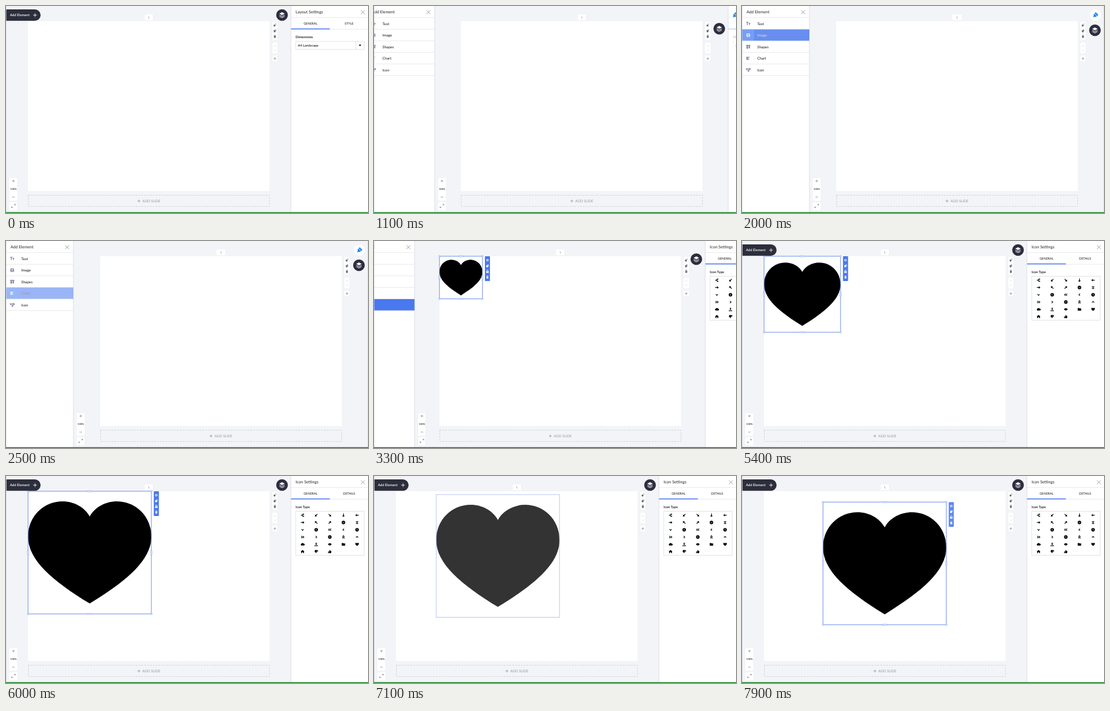
Animation, 640 px wide and 367 px high, one loop 8000 ms. Source, as an HTML page:

```html
<!DOCTYPE html>
<html lang="en">
<head>
<meta charset="utf-8">
<title>Slide editor</title>
<style>
  html, body { margin: 0; width: 100%; height: 100%; overflow: hidden; background: #f3f4f8; }
  svg { display: block; width: 100vw; height: 100vh; }
  text { font-family: Lato, "Open Sans", sans-serif; fill: #222; text-rendering: geometricPrecision; }
  .title { font-size: 7.2px; }
  .tab { font-size: 5.45px; text-anchor: middle; font-weight: 500; }
  .label { font-size: 5.9px; font-weight: 700; }
  .row { font-size: 6.4px; font-weight: 500; }
  .card { fill: #fff; filter: drop-shadow(0 .4px .6px #0003); }
  .line { fill: none; stroke: #e3e4e8; stroke-width: .8; }
  .thin { fill: none; stroke: #777; stroke-width: .7; }
  .pale { fill: none; stroke: #c4c7cf; stroke-width: .7; }
  .bold { fill: none; stroke: #000; stroke-width: 1.2; }
  .blue { fill: #4a78ee; }
  .handle { fill: #fff; stroke: #6d90ec; stroke-width: .7; }
</style>
</head>
<body>
<svg viewBox="0 0 640 367" preserveAspectRatio="none">
  <rect width="640" height="367" fill="#f3f4f8"/>

  <g id="work">
    <rect x="39" y="27" width="427" height="301" fill="#fff"/>
    <rect class="card" x="244.5" y="15" width="16" height="10" rx="1"/>
    <text x="252.5" y="21.6" font-size="4.6" text-anchor="middle" style="fill:#666">1</text>
    <rect x="39.5" y="335.5" width="426.5" height="20" fill="none" stroke="#cdd0d9" stroke-dasharray="3 2"/>
    <path class="thin" d="M232.3 345.7h5.4M235 343v5.4" style="stroke:#888"/>
    <text x="241" y="348" font-size="6.2" style="fill:#96979d">ADD SLIDE</text>
    <g id="slideTools" transform="translate(475.3 0)">
      <rect class="card" x="-5" y="28" width="10" height="32" rx="1"/>
      <rect class="card" x="-5" y="65" width="10" height="19" rx="1"/>
      <rect class="card" x="-5" y="88" width="10" height="10" rx="1"/>
      <g fill="#686b78">
        <path d="M-2 33h3v3.2h-3zM.5 32l1.5-1 .4 2z"/>
        <path d="M-2 43h3v3.4h-3zM-.8 41.8h3v3.4h-.7v-2.7h-2.3z"/>
        <path d="M-1.6 52.8h3.2v3.7h-3.2zM-2 51.7h4v.6h-4zM-.7 51h1.4v.6h-1.4z"/>
      </g>
      <path class="pale" d="M-1.5 71.6 0 70.2l1.5 1.4M-1.5 77.8 0 79.2l1.5-1.4"/>
      <path class="thin" d="M-2.4 93.2h4.8M0 90.8v4.8"/>
    </g>
    <g id="shape">
      <path id="heart" d="M50 91.3C20 73 0 56 0 37 0 20 13 8.3 28 8.3 37 8.3 46 13 50 20.6 54 13 63 8.3 72 8.3 87 8.3 100 20 100 37 100 56 80 73 50 91.3z"/>
      <rect id="frame" fill="none"/>
      <g id="handles"></g>
      <g id="shapeTools">
        <rect class="blue" width="9" height="44" rx="1"/>
        <circle cx="4.5" cy="7" r="1.5" fill="none" stroke="#fff" stroke-width="1.1"/>
        <g fill="#fff">
          <path d="M2.5 16h3v3.4h-3zM3.6 14.8h3.2v3.4h-.7v-2.7h-2.5z"/>
          <path d="M2.3 26.5h4.4v2.9h-4.4zM3 26v-.8a1.5 1.5 0 0 1 3 0v.8h-.7v-.7a.8.8 0 0 0-1.6 0v.7z"/>
          <path d="M3 35.8h3v3.6h-3zM2.5 34.7h4v.6h-4zM3.8 34h1.4v.6h-1.4z"/>
        </g>
      </g>
    </g>
    <path id="guide" d="M252.5 27v301" stroke="#6d90ec" stroke-width=".7"/>
  </g>

  <g id="zoom">
    <rect class="card" x="6" y="305" width="14" height="40" rx="1"/>
    <rect class="card" x="6" y="348" width="14" height="14" rx="1"/>
    <path class="thin" d="M10.8 310.3h4.6M13.1 308v4.6M10.8 338.8h4.6"/>
    <text x="13.2" y="326.3" font-size="4.4" font-weight="600" text-anchor="middle">100%</text>
    <path class="thin" d="M14.2 351.3h2.3v2.3M12 357.6H9.7v-2.3M16.5 351.3l-2 2M9.7 357.6l2-2"/>
  </g>

  <g id="addButton">
    <path d="M0 6H51a10 10 0 0 1 0 20.3H0z" fill="#2c2e3b"/>
    <text x="7" y="18.3" font-size="6.1" font-weight="600" style="fill:#fff">Add Element</text>
    <path d="M48 16.2h6.6M51.3 12.9v6.6" stroke="#fff" stroke-width=".9"/>
  </g>

  <g id="side">
    <rect width="137" height="367" fill="#fff"/>
    <path d="M-.3 0v367" stroke="#d6d8de" stroke-width=".8"/>
    <path class="line" d="M0 20.5h137M0 41.2h137"/>
    <g id="sideBody">
      <text id="sideTitle" class="title" x="8" y="13.2"></text>
      <path class="thin" d="m123.4 7.7 6.8 6.8m0-6.8-6.8 6.8"/>
      <rect class="blue" y="39.8" width="68.5" height="1.6"/>
      <text class="tab" x="34.3" y="33">GENERAL</text>
      <text id="secondTab" class="tab" x="102.6" y="33"></text>
      <text id="sideLabel" class="label" x="8" y="57.4"></text>
      <g id="sizeBox">
        <path d="M8.2 62.8h121v14.2h-121zM114.5 62.8v14.2" fill="none" stroke="#d8dae0" stroke-width=".8"/>
        <text class="label" x="12" y="72.2" style="font-weight:600">A4 Landscape</text>
        <path d="M119.8 68.6h4.2l-2.1 2.8z"/>
      </g>
      <g id="iconBox">
        <rect x="8.2" y="62.5" width="121" height="78" fill="none" stroke="#d8dae0" stroke-width=".8"/>
      </g>
    </g>
  </g>

  <g id="brush">
    <circle class="card" r="10.5"/>
    <g transform="rotate(45)">
      <rect x="-3.4" y="-4" width="6.8" height="3.6" rx=".6" fill="#2a97f3"/>
      <path d="M-3.4 .3h6.8l-1.5 2.7h-3.8z" fill="#1674d8"/>
      <rect x="-1" y="2.6" width="2" height="2.6" fill="#2a97f3"/>
    </g>
  </g>
  <g id="layers">
    <circle r="10.3" fill="#2c2e3f"/>
    <path d="M0-5 4.8-2.4 0 .2-4.8-2.4z" fill="#fff"/>
    <path d="M-4.6 0 0 2.5 4.6 0M-4.6 2.3 0 4.8 4.6 2.3" fill="none" stroke="#fff" stroke-width="1"/>
  </g>

  <g id="menu">
    <rect width="119" height="367" fill="#fff"/>
    <path d="M119.2 0v367" stroke="#dcdee4"/>
    <text class="title" x="8" y="13.2">Add Element</text>
    <path class="thin" d="m104.6 7.5 7 7m0-7-7 7"/>
    <path class="line" d="M0 20.6h119"/>
  </g>

  <path d="M.3 0v366" stroke="#d4d6dc" stroke-width=".7"/>
  <rect y="365.6" width="640" height="1.4" fill="#0b7a17"/>
</svg>

<script>
const LOOP = 8000, STEP = 100;
const MENU_W = 119, SIDE_W = 136;
const $ = id => document.getElementById(id);

function add(parent, tag, attrs, text) {
  const el = document.createElementNS("http://www.w3.org/2000/svg", tag);
  set(el, attrs);
  if (text) el.textContent = text;
  parent.append(el);
  return el;
}
function set(el, attrs) {
  for (const k in attrs) el.setAttribute(k, attrs[k]);
}
const move = (id, x, y = 0) => set($(id), { transform: `translate(${x} ${y})` });
const show = (id, on) => set($(id), { opacity: +on });
const clamp = x => Math.min(1, Math.max(0, x));
const mix = (a, b, p) => a + (b - a) * p;

// CSS "ease": cubic-bezier(.25, .1, .25, 1)
function ease(x) {
  x = clamp(x);
  let lo = 0, hi = 1;
  const at = (a, b, u) => 3 * a * u * (1 - u) ** 2 + 3 * b * u * u * (1 - u) + u ** 3;
  for (let i = 0; i < 24; i++) {
    const u = (lo + hi) / 2;
    if (at(.25, .25, u) < x) lo = u; else hi = u;
  }
  return at(.1, 1, lo);
}
const smooth = x => (x = clamp(x)) * x * (3 - 2 * x);

// Interpolates a table of [time, ...values].
function track(keys, t) {
  let i = 0;
  while (i < keys.length - 2 && t >= keys[i + 1][0]) i++;
  const [a, b] = [keys[i], keys[i + 1]];
  const p = clamp((t - a[0]) / (b[0] - a[0]));
  return a.slice(1).map((v, k) => mix(v, b[k + 1], p));
}

// Menu rows: name, icon path, hover start, hover end
const rows = [
  ["Text", "M-3.6-2.4h4M-1.6-2.4v5M.6-.4h3M2.1-.4v3", 1650, 1850],
  ["Image", "M-2.6-2.4h5.2v4.8h-5.2zM-2.4 1.8l1.6-2 1.2 1.2 1-1 1 1.4M-1-1h.8", 1850, 2080],
  ["Shapes", "M-3-2.8h2.4v2.4h-2.4zM1-2.8h2v2h-2zM-2.6 1h2v1.8h-2zM1.2.8h1.8l-.9 2z", 2080, 2350],
  ["Chart", "M-2.6-2.6v5.2M-2.6-1.9h5M-2.6 0h3.4M-2.6 1.9h4.4", 2400, 2600],
  ["Icon", "M-2.2.2-4-1.4q.2-1.4 1.8-.4 1.6-1 1.8.4zM1-2.4h2.6v2.2h-2.6zM-.8 2.4h2.4l-1.2-1.8z", 2640, 9999]
].map(([name, icon, from, to], i) => {
  const y = 31 + i * 20.5;
  const bg = add($("menu"), "rect", { x: 0, y: y - 10, width: 119, height: 20.5, class: "blue" });
  const cell = add($("menu"), "rect", { x: 0, y: y - 10, width: 21, height: 20.5, fill: "#8fbcff" });
  add($("menu"), "path", { class: "line", d: `M0 ${y + 10.3}h119` });
  const mark = add($("menu"), "path", { d: icon, transform: `translate(11 ${y + .2})`, fill: "none", "stroke-width": 1 });
  const label = add($("menu"), "text", { class: "row", x: 27, y: y + 2.6 }, name);
  return { from, to, bg, cell, mark, label };
});

function drawIcons() {
  const arrow = a => [a, "M-3 0H1.4", "M.4-2.3 3.2 0 .4 2.3z"];
  const chev = a => [a, "M-.9-1.9 1 0-.9 1.9"];
  const twin = a => [a, "M-2.3-1.9-.4 0-2.3 1.9M.4-1.9 2.3 0 .4 1.9"];
  const disc = a => [a, "", "M3.1 0A3.1 3.1 0 1 1-3.1 0 3.1 3.1 0 0 1 3.1 0z", "M-.6-1.4.8 0-.6 1.4"];
  const solid = d => [0, "", d];
  const thumb = "M-3-.3h1.3v3h-1.3zM-1.3-.3.2-2.9q1.3.1.7 2.2h2l-.7 3.4h-3.5z";
  const list = [
    [0, "M-3 0h2l1.6-1.8h1.2M-1 0 .6 1.8h1.2", "M1.2-3.2 3.2-1.8 1.2-.4zM1.2.4 3.2 1.8 1.2 3.2z"],
    arrow(135), arrow(45), arrow(90), arrow(180),
    arrow(0), arrow(225), arrow(315), disc(90), twin(90),
    chev(90), disc(180), twin(180), chev(180), disc(0),
    twin(0), chev(0), disc(270), twin(270), chev(270),
    solid("M-2 2.2a1.6 1.6 0 0 1-.2-3 2.2 2.2 0 0 1 4.2-.2 1.6 1.6 0 0 1 .3 3.2z"),
    [0, "M0-3v2.6M-3 2.6h6", "M-1.8-.8h3.6l-1.8 2.2z"],
    [0, "", "M-3.3 0q3.3-4.4 6.6 0-3.3 4.4-6.6 0z", "M-.5 0h1"],
    solid("M-3-2.3h2.3l.8.8h2.9v4h-6z"),
    solid("M0 2.8q-3.2-1.9-3.2-3.7c0-2.2 2.6-2.3 3.2-.6.6-1.7 3.2-1.6 3.2.6q0 1.8-3.2 3.7z"),
    solid("M0-3 3.3 0h-.8v2.8h-1.6v-1.8h-1.8v1.8h-1.6v-2.8h-.8z"),
    [180, "", thumb], solid(thumb)
  ];
  list.forEach(([angle, stroke, fill, hole], i) => {
    const x = 20.3 + i % 5 * 24.1, y = 69.5 + Math.floor(i / 5) * 12.9;
    const g = add($("iconBox"), "g", { transform: `translate(${x} ${y}) rotate(${angle})` });
    if (stroke) add(g, "path", { class: "bold", d: stroke });
    if (fill) add(g, "path", { d: fill });
    if (hole) add(g, "path", { d: hole, fill: "none", stroke: "#fff", "stroke-width": .9 });
  });
}
drawIcons();

const corners = [[0, 0], [1, 0], [0, 1], [1, 1]].map(([u, v]) =>
  ({ u, v, w: 2.6, h: 2.6 }));
const mids = [[.5, 0, 8, 2], [.5, 1, 8, 2], [0, .5, 2, 8], [1, .5, 2, 8]].map(([u, v, w, h]) =>
  ({ u, v, w, h }));
const knobs = [...corners, ...mids].map(k => ({
  ...k, el: add($("handles"), "rect", { class: "handle", width: k.w, height: k.h, rx: .8 })
}));

const drag = [
  [6700, 39, 27], [6800, 43, 27], [6900, 61, 28], [7000, 87, 30], [7100, 110, 33],
  [7200, 126, 37], [7300, 136, 41], [7400, 142, 44.5], [7500, 143.2, 46.2]
];

function drawPanels(t) {
  const open = t < 2500 ? ease((t - 770) / 530) : 1 - ease((t - 3170) / 530);
  const left = MENU_W * open, right = mix(504, 640, open);
  move("work", (left + right) / 2 - 252);
  move("zoom", left);
  move("menu", left - MENU_W - (open ? 0 : 2));
  move("addButton", -MENU_W * open);
  move("side", right);
  move("layers", right - 16, mix(16, 43, open));
  move("brush", 625 + SIDE_W * (1 - open), 16);
  show("brush", open > 0);

  const icons = t >= 3100;
  $("sideTitle").textContent = icons ? "Icon Settings" : "Layout Settings";
  $("secondTab").textContent = icons ? "DETAILS" : "STYLE";
  $("sideLabel").textContent = icons ? "Icon Type" : "Dimensions";
  show("sizeBox", !icons);
  show("iconBox", icons);
  set($("sideBody"), { opacity: icons ? 1 : 1 - open * .85 });
}

function drawMenu(t) {
  for (const r of rows) {
    const on = clamp((Math.min(t, r.to) - r.from) / 180) * (1 - clamp((t - r.to) / 140));
    set(r.bg, { opacity: on });
    set(r.cell, { opacity: on * .4 });
    const shade = Math.round(mix(34, 255, on));
    r.label.style.fill = `rgb(${shade},${shade},${shade})`;
    set(r.mark, { stroke: on > .3 ? "#fff" : "#5d6189" });
  }
}

function drawShape(t) {
  show("shape", t >= 3200);
  const size = mix(76, 218, smooth((t - 5000) / 900));
  const [x, y] = track(drag, t);
  const dragging = t >= 6800 && t < 7800;
  move("shape", x, y);
  set($("heart"), { transform: `scale(${size / 100})`, fill: dragging ? "#333" : "#000" });
  set($("frame"), {
    width: size, height: size - .5,
    stroke: dragging ? "#a3b4ea" : "#7595ea", "stroke-width": dragging ? .8 : 1.1
  });
  for (const k of knobs) set(k.el, { x: k.u * size - k.w / 2, y: k.v * (size - .5) - k.h / 2 });
  show("handles", !dragging);
  move("shapeTools", size + 4.3);
  set($("shapeTools"), { opacity: dragging ? 0 : t < 7800 ? 1 : t < 7900 ? .45 : .88 });
  show("guide", t >= 7400 && t < 7800);
}

const start = performance.now();
function render() {
  const now = (performance.now() - start) % LOOP;
  const t = Math.floor((now + 8) / STEP) * STEP % LOOP;
  drawPanels(t);
  drawMenu(t);
  drawShape(t);
  requestAnimationFrame(render);
}
render();
</script>
</body>
</html>
```
